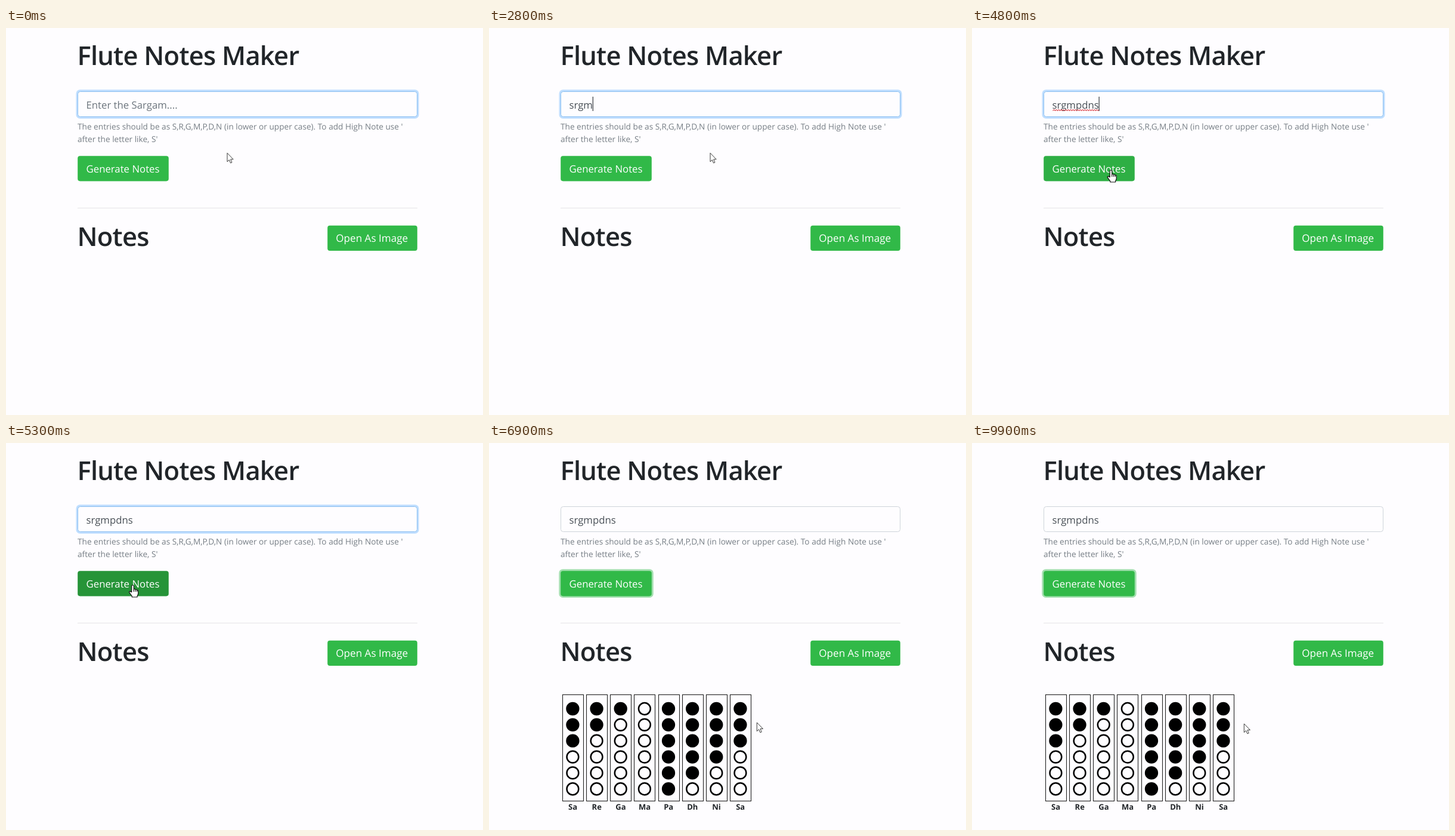
Write an HTML page that moves like this. It is 800 px wide and 648 px high and loops after 10 s.

```html
<!DOCTYPE html>
<html lang="en">
<head>
<meta charset="utf-8">
<title>Flute Notes Maker</title>
<style>
  html, body { margin: 0; width: 100%; height: 100%; overflow: hidden; background: #fefdff; }
  svg { display: block; width: 800px; height: 648px; }
  text { font-family: "Open Sans", "Noto Sans", sans-serif; text-rendering: geometricPrecision; }
  .head { font-size: 43.5px; font-weight: 600; letter-spacing: -0.76px; fill: #212529; }
  .field { font-size: 16.75px; fill: #495057; }
  .hint { font-size: 13.65px; fill: #767e85; }
  .btn { font-size: 16.8px; fill: #fff; }
  .label { font-size: 13px; font-weight: 700; text-anchor: middle; fill: #212529; }
</style>
</head>
<body>
<svg viewBox="0 0 800 648">
  <rect width="800" height="648" fill="#fefdff"/>
  <text class="head" x="119.5" y="61.5">Flute Notes Maker</text>

  <rect id="inputRing" x="117.5" y="103.3" width="575" height="48.4" rx="6.5" fill="#bfdeff"/>
  <rect id="input" x="120.5" y="106.5" width="569" height="42" rx="4" fill="#fefdff"/>
  <text id="placeholder" class="field" x="134.5" y="134.8" style="fill:#6c757d">Enter the Sargam....</text>
  <text id="typed" class="field" x="134.5" y="134.8"></text>
  <path id="squiggle" fill="none" stroke="#dc4a50" stroke-width="1.1"/>
  <rect id="caret" y="115" width="1.2" height="24" fill="#33383d"/>

  <text class="hint" x="120" y="169.5">The entries should be as S,R,G,M,P,D,N (in lower or upper case). To add High Note use '</text>
  <text class="hint" x="120" y="191">after the letter like, S'</text>

  <rect id="btnRing" x="117.3" y="211.2" width="158.4" height="47.8" rx="6.5" fill="#a2dfae"/>
  <rect id="btn" x="120.2" y="214.2" width="152.6" height="42.2" rx="4"/>
  <text class="btn" x="134.5" y="242">Generate Notes</text>

  <rect x="120" y="301" width="570" height="1" fill="#e5e4e7"/>
  <text class="head" x="119.5" y="364.8">Notes</text>
  <rect x="539.2" y="330.8" width="150.6" height="42.2" rx="4" fill="#31b948"/>
  <text class="btn" x="553.3" y="358.2" style="font-size:17.1px">Open As Image</text>

  <g id="notes"></g>

  <path id="arrow" fill="#fff" stroke="#3a3a3a" stroke-width="1" stroke-linejoin="round"
    d="M0 0V14.6L3.3 11.5L5.6 16.8L7.9 15.8L5.7 10.6H10.2Z"/>
  <path id="hand" fill="#fff" stroke="#111" stroke-width="1.2" stroke-linejoin="round"
    d="M-1.8 12V1.4Q-1.6 0 0 0Q1.6 0 1.8 1.4V7Q3.4 5.6 4.6 7.6Q6.2 6.6 7.2 8.4Q9 7.8 9.2 10V14.5Q8.6 17 7.6 18.2V20H-1.2V18.4Q-3.4 15.6-5.6 12.4Q-6.2 10.4-4.4 10.4Q-3 10.6-1.8 12M1.8 7V11M4.6 7.6V11M7.2 8.4V11"/>
</svg>
<script>
  const LOOP = 10000;
  const WORD = "srgmpdns";
  const KEY_TIMES = [1250, 1750, 2250, 2700, 3050, 3400, 3550, 3700];
  const HOVER = 4760, CLICK = 5300, RESULT = 5500, LEAVE = 6400;
  const POINTER = [
    [0, 371, 209.3], [4400, 371, 209.3], [4800, 233, 238], [5150, 212.5, 238],
    [6300, 212.5, 238], [6850, 449.3, 468], [6900, 449.3, 468], [7150, 456.3, 470], [LOOP, 456.3, 470]
  ];
  const NOTES = [["Sa", 3], ["Re", 2], ["Ga", 1], ["Ma", 0], ["Pa", 6], ["Dh", 5], ["Ni", 4], ["Sa", 3]];

  const el = id => document.getElementById(id);
  const show = (id, on) => { el(id).style.visibility = on ? "visible" : "hidden"; };
  const clamp = v => Math.max(0, Math.min(1, v));
  const fade = (t, start) => clamp((t - start) / 150);
  const smooth = u => u * u * (3 - 2 * u);
  const mix = (a, b, u) => `rgb(${a.map((v, i) => Math.round(v + (b[i] - v) * u))})`;

  function add(parent, name, attrs, text) {
    const node = document.createElementNS("http://www.w3.org/2000/svg", name);
    for (const key in attrs) node.setAttribute(key, attrs[key]);
    if (text) node.textContent = text;
    parent.appendChild(node);
  }

  function buildNotes() {
    const g = el("notes");
    NOTES.forEach(([name, closed], i) => {
      const x = 40.15 * i;
      add(g, "rect", { x: Math.round(x + 123) + 0.5, y: 421.5, width: 35, height: 178,
        fill: "none", stroke: "#222", "stroke-width": 1.1 });
      for (let j = 0; j < 6; j++) {
        add(g, "circle", { cx: x + 140.4, cy: 445 + 26.85 * j, r: 9.9,
          fill: j < closed ? "#000" : "#fefdff", stroke: "#000", "stroke-width": 2.5 });
      }
      add(g, "text", { class: "label", x: x + 140.6, y: 613.5 }, name);
    });
  }

  function buildSquiggle() {
    let d = "M135.5 138.5";
    for (let x = 137.5, up = true; x < 214; x += 2, up = !up) d += `L${x} ${up ? 136.7 : 138.5}`;
    el("squiggle").setAttribute("d", d);
  }

  function pointerAt(t) {
    const i = POINTER.findIndex(p => p[0] > t);
    const [t0, x0, y0] = POINTER[i - 1], [t1, x1, y1] = POINTER[i];
    const u = smooth((t - t0) / (t1 - t0));
    return [x0 + (x1 - x0) * u, y0 + (y1 - y0) * u];
  }

  function draw(t) {
    const count = KEY_TIMES.filter(k => k <= t).length;
    const typed = el("typed");
    const word = WORD.slice(0, count);
    if (typed.textContent !== word) typed.textContent = word;
    show("placeholder", count === 0);

    // the caret restarts its blink with every key
    const blinkStart = count ? KEY_TIMES[count - 1] : -500;
    show("caret", t < CLICK && (t - blinkStart) % 1000 < 500);
    el("caret").setAttribute("x", 134.3 + (count ? typed.getComputedTextLength() : 0));
    show("squiggle", t >= 4400 && t < CLICK);

    const blur = fade(t, CLICK);
    el("inputRing").setAttribute("opacity", 1 - blur);
    el("input").setAttribute("stroke", mix([138, 190, 240], [206, 212, 218], blur));
    el("btnRing").setAttribute("opacity", blur);
    const dark = fade(t, HOVER) - fade(t, LEAVE);
    el("btn").setAttribute("fill", mix([49, 185, 72], [38, 148, 56], dark));
    show("notes", t >= RESULT);

    const [x, y] = pointerAt(t);
    const over = x >= 120 && x <= 273 && y >= 214 && y <= 256;
    show("hand", over);
    show("arrow", !over);
    el(over ? "hand" : "arrow").setAttribute("transform", `translate(${x} ${y})`);
  }

  function frame() {
    draw(performance.now() % LOOP);
    requestAnimationFrame(frame);
  }

  buildNotes();
  buildSquiggle();
  frame();
</script>
</body>
</html>
```
